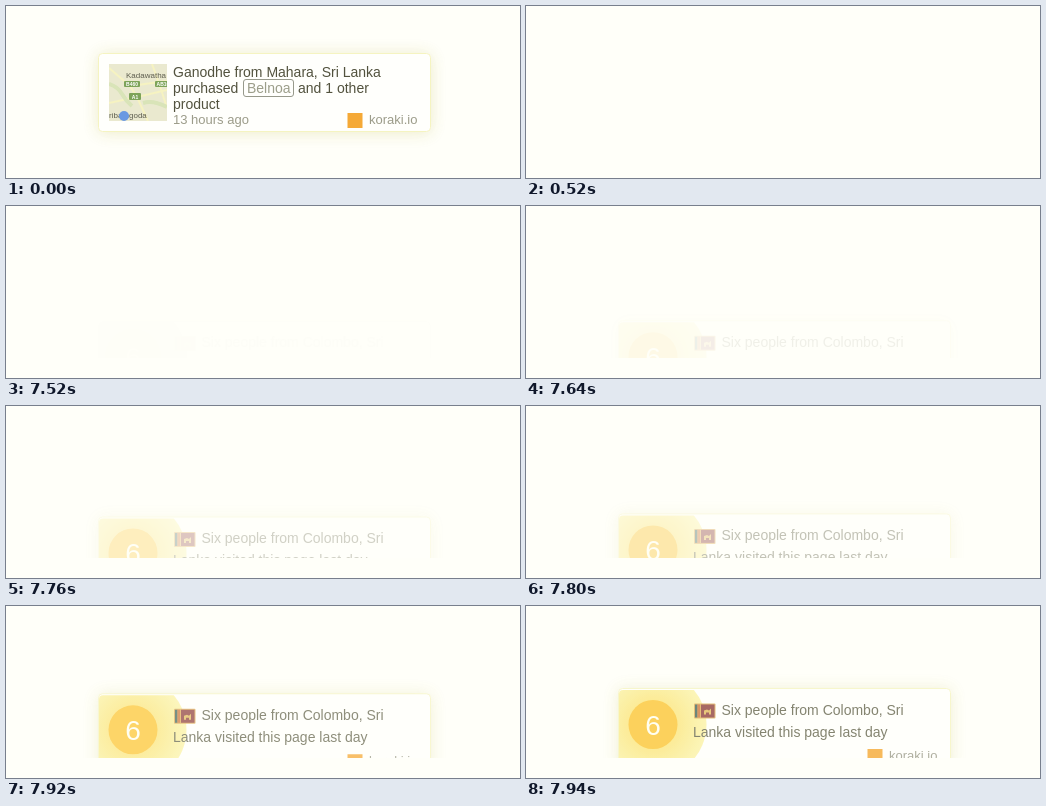
Recreate the animation shown at these times as an HTML page. Size 514 px wide and 172 px high, loop 8000 ms.

```html
<!DOCTYPE html>
<html lang="en">
<head>
<meta charset="utf-8">
<style>
  html, body { margin: 0; height: 100%; overflow: hidden; background: #fffff9; }
  svg { display: block; width: 514px; height: 172px; }
  text { font: 14px "Liberation Sans", Arial, sans-serif; fill: #40402a; }
  .small { font-size: 13px; fill: #92927e; }
  .card { fill: #fffffd; stroke: #f5f3bc; filter: drop-shadow(0 1px 8px rgba(180, 175, 50, .27)); }
  .map text { font-size: 8px; fill: #4c4c3c; }
  .map .badge { font-size: 5px; font-weight: bold; fill: #fff; text-anchor: middle; }
  #visit .line { fill: #56563c; }
  #visit .count { font-size: 28px; fill: #fffff0; text-anchor: middle; }
</style>
</head>
<body>
<svg viewBox="0 0 514 172">
  <defs>
    <clipPath id="mapClip"><rect x="103" y="58" width="58" height="57"/></clipPath>
    <clipPath id="cardClip"><rect x="93" y="84" width="331" height="79" rx="4"/></clipPath>
    <clipPath id="stageClip"><rect width="514" height="152"/></clipPath>
    <radialGradient id="halo">
      <stop offset=".45" stop-color="#fbe472"/>
      <stop offset=".75" stop-color="#faec8c"/>
      <stop offset="1" stop-color="#fbf2a0"/>
    </radialGradient>
    <g id="footer">
      <rect x="341.5" y="107" width="15" height="15" fill="#f5a021"/>
      <text class="small" x="363" y="118">koraki.io</text>
    </g>
  </defs>

  <g id="purchase">
    <rect class="card" x="92.5" y="47.5" width="332" height="78" rx="4"/>
    <g class="map" clip-path="url(#mapClip)">
      <rect x="103" y="58" width="58" height="57" fill="#e8e7cb"/>
      <path d="M103 62L124 80L131 91L142 115M103 97L131 91L161 84M124 80L161 75M146 58L154 80L161 102"
            fill="none" stroke="#f6f2bc" stroke-width="2"/>
      <path d="M103 78q9 3 13 10t10 12M137 97q10-3 24 4" fill="none" stroke="#d5e2b2" stroke-width="4"/>
      <g fill="#6f9a48">
        <rect x="118" y="75" width="16" height="6" rx="1"/>
        <rect x="149" y="75" width="16" height="6" rx="1"/>
        <rect x="123" y="87" width="12" height="7" rx="1"/>
      </g>
      <text class="badge" x="126" y="80">B460</text>
      <text class="badge" x="157" y="80">AB10</text>
      <text class="badge" x="129" y="92.5">A1</text>
      <text x="120" y="72">Kadawatha</text>
      <text x="103" y="112">ribathgoda</text>
      <circle cx="118" cy="110" r="5" fill="#5a8fe0"/>
    </g>
    <text x="167" y="71">Ganodhe from Mahara, Sri Lanka</text>
    <text x="167" y="87">purchased</text>
    <rect x="237.5" y="73.5" width="50" height="17" rx="2.5" fill="none" stroke="#8c8e80"/>
    <text x="241" y="87" style="fill:#92947e">Belnoa</text>
    <text x="292" y="87">and 1 other</text>
    <text x="167" y="103">product</text>
    <text class="small" x="167" y="118">13 hours ago</text>
    <use href="#footer"/>
  </g>

  <g clip-path="url(#stageClip)">
    <g id="visit">
      <rect class="card" x="92.5" y="82.5" width="332" height="80" rx="4"/>
      <g clip-path="url(#cardClip)">
        <circle cx="127" cy="118.5" r="53.5" fill="url(#halo)"/>
        <circle cx="127" cy="118.5" r="24.5" fill="#fcc020"/>
      </g>
      <text class="count" x="127" y="128.5">6</text>
      <rect x="168" y="97.5" width="21.5" height="15" rx="1" fill="#dca648"/>
      <rect x="169" y="98.5" width="2.5" height="13" fill="#34584a"/>
      <rect x="171.5" y="98.5" width="2.5" height="13" fill="#cc6c2c"/>
      <rect x="175" y="98.5" width="13.5" height="13" fill="#86302c"/>
      <path d="M178 108.5v-4l3-1 2 1 2-2v6h-2v-2h-3v2z" fill="#e0b44c"/>
      <text class="line" x="195.5" y="109">Six people from Colombo, Sri</text>
      <text class="line" x="167" y="131">Lanka visited this page last day</text>
      <use href="#footer" y="36"/>
    </g>
  </g>
</svg>
<script>
  const LOOP = 8000, ENTER = 7500, RISE = 440;
  const purchase = document.getElementById("purchase");
  const visit = document.getElementById("visit");

  function draw(now) {
    const t = now % LOOP;
    purchase.setAttribute("opacity", t < 500 ? 0.9 : t < 520 ? 0.15 : 0);

    // The second card accelerates upwards while it fades in.
    const u = t < ENTER + 20 ? 0 : Math.min(1, (t - ENTER) / RISE);
    visit.setAttribute("opacity", 0.72 * u ** 1.9);
    visit.setAttribute("transform", `translate(0 ${32.5 * (1 - u ** 4)})`);
    requestAnimationFrame(() => draw(performance.now() - start));
  }

  const start = performance.now();
  draw(0);
</script>
</body>
</html>
```
